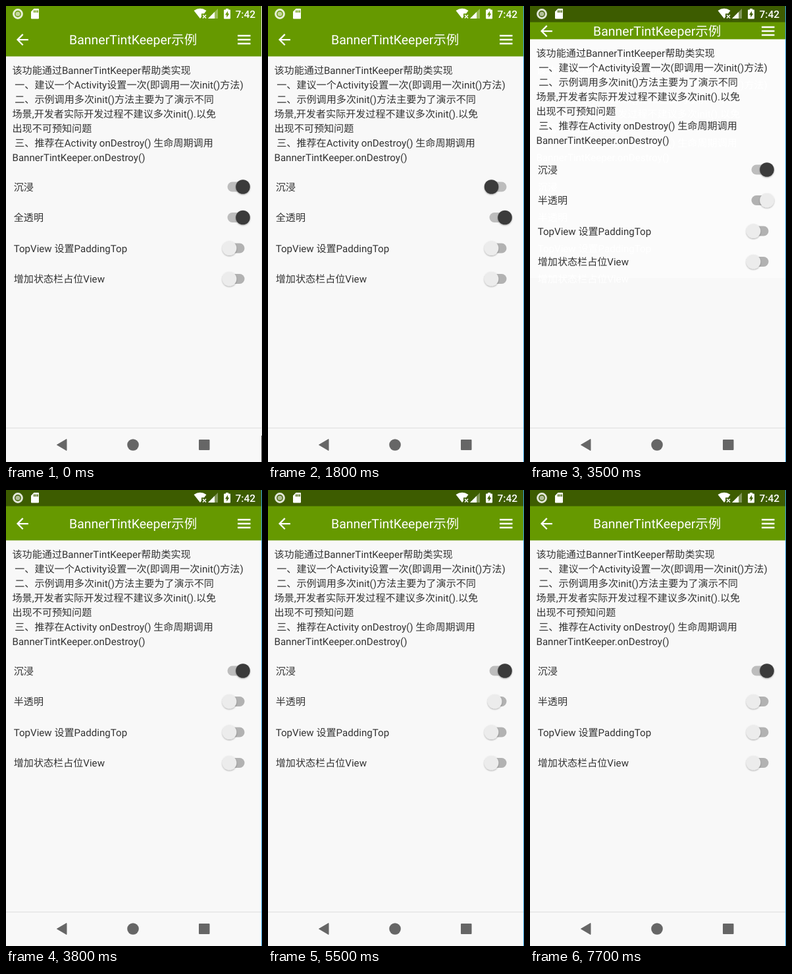
These frames come from a looping animation (389 px wide and 691 px high, 8 s). An HTML page:

```html
<!DOCTYPE html>
<html lang="zh-CN">
<head>
<meta charset="utf-8">
<style>
html, body { margin: 0; width: 100%; height: 100%; overflow: hidden; background: #f8f8f8; }
svg { display: block; width: 389px; height: 691px; }
text {
  font: 15.1px Roboto, "Noto Sans CJK SC", "Noto Sans CJK", sans-serif;
  white-space: pre;
  text-rendering: geometricPrecision;
}
#title text { font-size: 19.5px; }
#clock { font-size: 15.5px; font-weight: 500; }
</style>
</head>
<body>
<svg viewBox="0 0 389 691">
  <defs>
    <g id="words"></g>
    <filter id="soft" x="-30%" y="-30%" width="160%" height="160%">
      <feDropShadow dx="0" dy="1" stdDeviation="0.9" flood-opacity=".35"/>
    </filter>
  </defs>
  <rect width="389" height="691" fill="#f8f8f8"/>

  <g id="ghost">
    <rect y="50" width="388" height="362" fill="#fbfbfb"/>
    <use href="#words" fill="#fff"/>
  </g>
  <g id="page">
    <use href="#words" fill="#333"/>
    <g id="switches"></g>
  </g>

  <rect id="toolbar" width="388" fill="#690"/>
  <g id="title" fill="#fff">
    <path transform="translate(11.5 37.6) scale(1.12)" d="M20 11H7.83l5.59-5.59L12 4l-8 8 8 8 1.41-1.41L7.83 13H20z"/>
    <text x="96" y="58">BannerTintKeeper示例</text>
    <path d="M352 45h19.500M352 51h19.500M352 57h19.500" stroke="#fff" stroke-width="2.7"/>
  </g>

  <rect id="bar" width="388" height="24.5"/>
  <g fill="#fff">
    <circle cx="18" cy="12" r="6.4" fill="none" stroke="#fff" stroke-width="3" opacity=".85"/>
    <circle cx="18" cy="12" r="3.6" opacity=".6"/>
    <path fill-rule="evenodd" d="M42.5 4H49q1 0 1 1V18.500q0 1-1 1H39q-1 0-1-1V8.500zM42 6.500V10h1.500V6.500zM44.700 6.500V10h1.500V6.500zM47.300 6.500V10h1.500V6.500z"/>
    <path d="M285.500 7Q295 .5 304.500 7L301 11.500H297V16.500L295 19z"/>
    <path d="M299 13.500l5 5m0-5l-5 5" stroke="#fff" stroke-width="1.500"/>
    <path d="M322 4V19H307z" opacity=".35"/>
    <path d="M317 9V19H307z"/>
    <path fill-rule="evenodd" d="M334 4h4v1.500h2q1 0 1 1V18.500q0 1-1 1h-8q-1 0-1-1V6.500q0-1 1-1h2zM337 7.500l-4 6h2.300v4l4-6H337z"/>
    <text id="clock" x="348.500" y="17.500">7:42</text>
  </g>

  <path d="M0 639.500H388" stroke="#dedede"/>
  <g fill="#666">
    <path d="M77.500 665L92 656.500V673.500z" stroke="#666" stroke-linejoin="round"/>
    <circle cx="193" cy="665" r="8.800"/>
    <rect x="293" y="657" width="16.500" height="16" rx="1"/>
  </g>
  <rect id="edge" x="388" width="1" height="691"/>
  <rect id="edgeEnd" x="388" y="651" width="1" height="40" fill="#444"/>
</svg>
<script>
const $ = id => document.getElementById(id);
const set = (el, attrs) => { for (const k in attrs) el.setAttribute(k, attrs[k]); return el; };
const add = (parent, tag, attrs) =>
  parent.appendChild(set(document.createElementNS("http://www.w3.org/2000/svg", tag), attrs));

const info = [
  "该功能通过BannerTintKeeper帮助类实现",
  " 一、建议一个Activity设置一次(即调用一次init()方法)",
  " 二、示例调用多次init()方法主要为了演示不同",
  "场景,开发者实际开发过程不建议多次init().以免",
  "出现不可预知问题",
  " 三、推荐在Activity onDestroy() 生命周期调用",
  "BannerTintKeeper.onDestroy()"
];
info.forEach((line, i) => add($("words"), "text", { x: 9.5, y: 103 + 22 * i }).textContent = line);

// Label when off, label when on
const labels = [
  ["不沉浸", "沉浸"],
  ["半透明", "全透明"],
  ["TopView 设置PaddingTop", "TopView 设置MarginTop"],
  ["增加状态栏占位View", "增加状态栏占位View"]
];
const rows = labels.map((names, i) => {
  const y = 274 + 46.5 * i;
  const g = add($("switches"), "g", {});
  return {
    names, g,
    label: add($("words"), "text", { x: 11.7, y: y + 5.5 }),
    track: add(g, "rect", { x: 336.5, y: y - 7.5, width: 26, height: 15, rx: 7.5 }),
    thumb: add(g, "circle", { cy: y, r: 10.8, filter: "url(#soft)" })
  };
});

// Start time, switch values, which switch slides, number of 100 ms steps
const states = [
  { at: 0, on: [1, 1, 0, 0] },
  { at: 700, on: [0, 1, 0, 0], moved: 0, steps: 5 },
  { at: 1800, on: [1, 1, 0, 0], moved: 0, steps: 3 },
  { at: 3500, on: [1, 0, 0, 0], moved: 1, steps: 4, jump: true },
  { at: 4800, on: [1, 1, 0, 0], moved: 1, steps: 3 },
  { at: 5300, on: [1, 0, 0, 0], moved: 1, steps: 4 },
  { at: 6600, on: [1, 0, 1, 0], moved: 2, steps: 3 },
  { at: 7400, on: [1, 0, 0, 0], moved: 2, steps: 4 }
];

function barColor([immersed, clear, margin]) {
  if (!immersed) return "#000";
  if (clear) return "#690";
  return margin ? "#999" : "#3d5c00";
}

function render(t) {
  const s = states.filter(e => e.at <= t).pop();
  const step = Math.floor((t - s.at) / 100);
  const p = s.steps ? Math.min(1, step / (s.steps - 1)) : 1;
  const ease = (1 - Math.cos(Math.PI * p)) / 2;
  const lift = s.jump && step === 0 ? 26 : 0;

  rows.forEach((r, i) => {
    const on = s.on[i];
    const pos = i !== s.moved ? on : on ? ease : 1 - ease;
    const display = i && !s.on[0] ? "none" : "inline";
    set(r.g, { display });
    set(r.label, { display }).textContent = r.names[on];
    set(r.track, { fill: on ? "#bdbdbd" : "#b2b2b2" });
    set(r.thumb, { cx: 339.5 + 20.5 * pos, fill: on ? "#3a3a3a" : "#ececec" });
  });

  set($("page"), { transform: `translate(0 ${-lift})` });
  set($("title"), { transform: `translate(0 ${-lift / 2})` });
  set($("toolbar"), { height: 76.4 - lift });
  set($("ghost"), { display: lift ? "inline" : "none" });
  set($("bar"), { fill: barColor(s.on) });
  set($("edge"), { fill: s.at ? "#2f9fe0" : "#e6e6e6" });
  set($("edgeEnd"), { display: s.at ? "none" : "inline" });
}

function tick() {
  render(performance.now() % 8000);
  requestAnimationFrame(tick);
}
tick();
</script>
</body>
</html>
```
